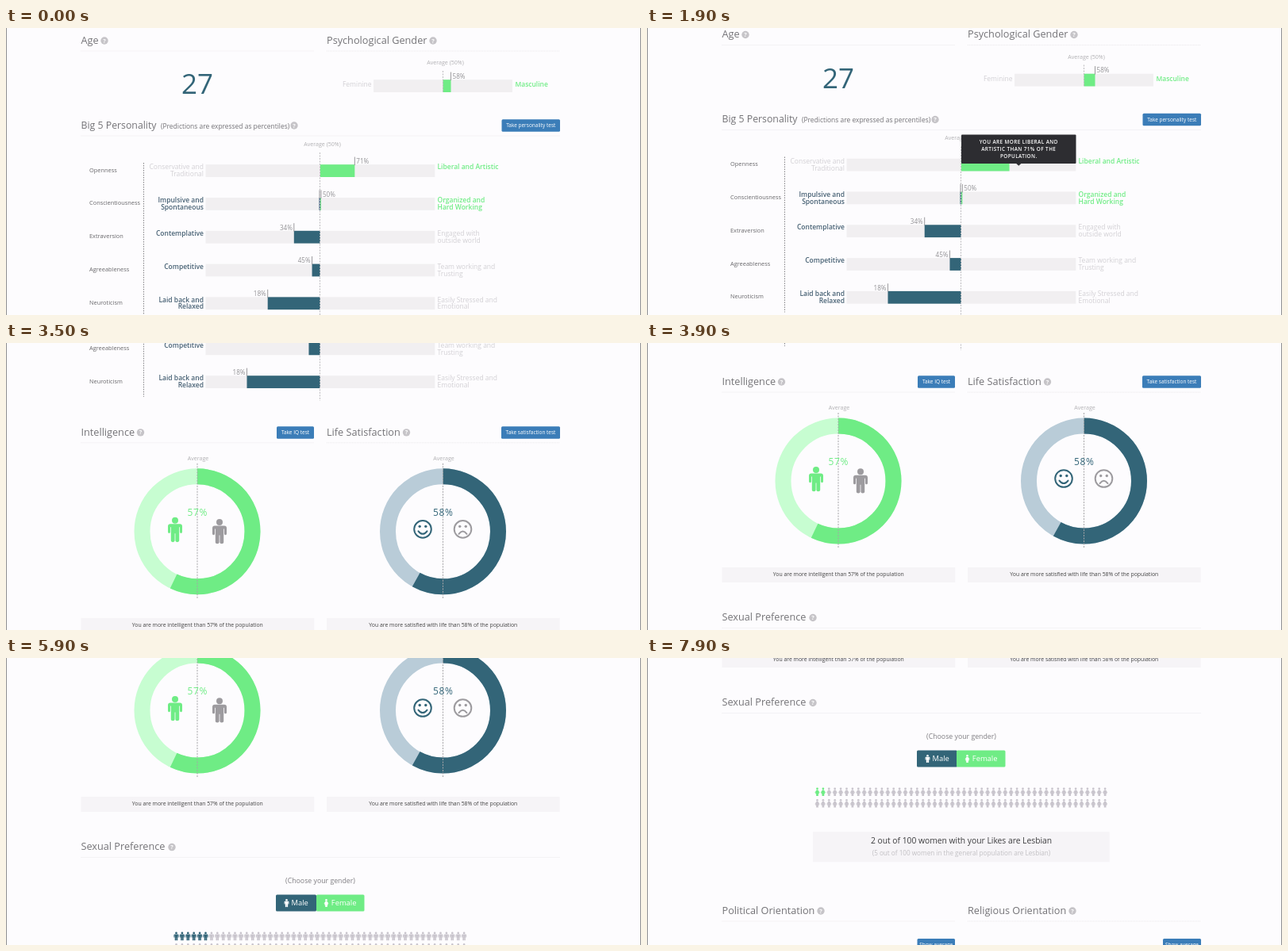
These frames come from a looping animation (800 by 362 pixels, 8 s). An HTML page:

```html
<!DOCTYPE html>
<html lang="en">
<head>
<meta charset="utf-8">
<title>Personality results</title>
<style>
  html, body { margin: 0; width: 100%; height: 100%; overflow: hidden; background: #fdfcfe; }
  svg { display: block; font-family: "Open Sans", sans-serif; }
</style>
</head>
<body>
<svg id="stage" width="800" height="362" viewBox="0 0 800 362"></svg>
<script>
const GREEN = '#6fec85', TEAL = '#336578', TRACK = '#f1eff1', PANEL = '#f6f4f7',
      FADED = '#d2d0d4', AXIS = '#bdbcbf', TICK = '#9c9b9e', BLUE = '#3b7db8', DARK = '#2d2d31';
const LOOP = 8000;

// Shape helpers; a text's y is the middle of its capitals.
const rect = (x, y, w, h, fill, more = '') =>
  `<rect x="${x}" y="${y}" width="${w}" height="${h}" fill="${fill}" ${more}/>`;
const text = (x, y, size, fill, str, anchor = 'start', more = '') =>
  `<text x="${x}" y="${y + size * .35}" font-size="${size}" fill="${fill}" text-anchor="${anchor}" ${more}>${str}</text>`;
const line = (x1, y1, x2, y2, color, dash = '', width = 1) =>
  `<line x1="${x1}" y1="${y1}" x2="${x2}" y2="${y2}" stroke="${color}" stroke-width="${width}" stroke-dasharray="${dash}"/>`;

const BODY = {
  man: 'M3 8.5h12q3 0 3 3v7q0 1.6-1.5 1.6t-1.5-1.6v-6h-.8v17q0 1.8-2.4 1.8t-2.4-1.8v-9h-.8v9q0 1.8-2.4 1.8t-2.4-1.8v-17h-.8v6q0 1.6-1.5 1.6t-1.5-1.6v-7q0-3 3-3z',
  woman: 'M6 8.5h6l6 9.5-2 1.5-3.2-4.5 3.7 8H13v8H5v-8H1.5l3.7-8L2 19.5 0 18z'
};
const person = (kind, cx, cy, height, fill) => {
  const s = height / 31;
  return `<g transform="translate(${cx - 9 * s} ${cy - 15.5 * s}) scale(${s})" fill="${fill}">
    <circle cx="9" cy="4" r="4"/><path d="${BODY[kind]}"/></g>`;
};
const face = (cx, cy, color, mouth) =>
  `<g transform="translate(${cx} ${cy})" fill="none" stroke="${color}" stroke-width="2" stroke-linecap="round">
    <circle r="10.8"/><path d="${mouth}"/>
    <g fill="${color}" stroke="none"><circle cx="-3.8" cy="-3.5" r="1.7"/><circle cx="3.8" cy="-3.5" r="1.7"/></g></g>`;

const heading = (x, y, str, helpX, right, size = 12.7) =>
  text(x, y, size, '#747377', str) +
  `<circle cx="${helpX}" cy="${y + .5}" r="4.7" fill="#c6c4c8"/>` +
  text(helpX, y + .5, 7.4, '#fff', '?', 'middle', 'font-weight="700"') +
  line(x, y + 13.5, right, y + 13.5, '#e9e7ea', '1 1');
const button = (x, y, w, str) =>
  rect(x, y, w, 15.5, BLUE, 'rx="1.5"') + text(x + w / 2, y + 7.6, 6.5, '#fff', str, 'middle');

// A bar growing from the 50% axis.
const meters = [];
function meter(x, w, cy, value, label) {
  const i = meters.length, up = value > 50, mid = x + w / 2;
  meters.push({ mid, reach: (value - 50) / 100 * w });
  return rect(x, cy - 7.9, w, 15.8, TRACK) +
    rect(mid, cy - 7.9, 0, 15.8, up ? GREEN : TEAL, `id="bar${i}"`) +
    `<g id="tip${i}">` + line(0, cy - 17.5, 0, cy - 7, TICK) +
    text(up ? 2 : -2, cy - 12, 8.1, '#949396', label, up ? 'start' : 'end') + '</g>';
}
function sideLabel(x, cy, str, anchor, color) {
  const faded = color === FADED;
  const more = faded ? '' : 'font-weight="600"';
  return str.split('|').map((s, i) =>
    text(x, cy - 4.7 + i * 8.9, 8.5, color, s, anchor, more)).join('');
}

const traits = [
  ['Openness', 71, 'Conservative and|Traditional', 'Liberal and Artistic'],
  ['Conscientiousness', 50.5, 'Impulsive and|Spontaneous', 'Organized and|Hard Working'],
  ['Extraversion', 34, 'Contemplative', 'Engaged with|outside world'],
  ['Agreeableness', 45, 'Competitive', 'Team working and|Trusting'],
  ['Neuroticism', 18, 'Laid back and|Relaxed', 'Easily Stressed and|Emotional']
];
const traitRow = ([name, value, low, high], i) => {
  const cy = 180.1 + i * 41.8, up = value > 50;
  return text(105, cy - 1, 7.4, '#68676a', name) +
    meter(251.5, 288.8, cy, value, Math.floor(value) + '%') +
    (i === 1 ? rect(394.5, cy - 7.9, 1.6, 15.8, TEAL) + line(395, cy - 17.5, 395, cy - 7, TICK) : '') +
    sideLabel(249, cy, low, 'end', i ? '#466073' : FADED) +
    sideLabel(543.5, cy, high, 'start', up ? GREEN : FADED);
};

function donut(cx, share, color, pale, icons) {
  const cy = 536, r = 69.5, len = 2 * Math.PI * r;
  const ring = (stroke, dash) => `<circle cx="${cx}" cy="${cy}" r="${r}" fill="none" stroke="${stroke}"
    stroke-width="20" stroke-dasharray="${dash}" transform="rotate(-90 ${cx} ${cy})"/>`;
  return text(cx + 1, 443.5, 7.1, '#b2b1b4', 'Average', 'middle') +
    ring(pale, '') + ring(color, `${len * share / 100} ${len}`) +
    line(cx, 450, cx, 621, '#a5a4a7', '2 1.5') +
    text(cx + .3, 512, 12, color, share + '%', 'middle', 'letter-spacing=".6"') + icons;
}
const panel = (x, str) => rect(x, 645, 293.7, 19, PANEL) + text(x + 146.8, 654, 6.87, '#444', str, 'middle');

function tooltip(id, x, y, w, h, size, gap, spacing, lines) {
  const cx = x + w / 2, first = y + h / 2 - (lines.length - 1) * gap / 2;
  return `<g id="${id}">` + rect(x, y, w, h, DARK, 'rx="1"') +
    `<path d="M${cx - 3} ${y + h}h6l-3 2.8z" fill="${DARK}"/>` +
    lines.map((s, i) => text(cx, first + i * gap, size, '#fff', s, 'middle',
      `letter-spacing="${spacing}" font-weight="600"`)).join('') + '</g>';
}

function crowd(id, kind, count, color, result, general) {
  const people = Array.from({ length: 100 }, (_, i) =>
    person(kind, 214.5 + i % 50 * 7.4, i < 50 ? 820.8 : 835.3, 10.6, i < count ? color : '#c9c5cd'));
  return `<g id="${id}">` + people.join('') +
    text(396, 882.8, 10.3, '#3c3c3e', result, 'middle') +
    text(396, 898, 8.17, '#c2c0c4', general, 'middle') + '</g>';
}

const page = [
  heading(94.5, 15.5, 'Age', 124, 388),
  text(241, 70.8, 35, TEAL, '27', 'middle'),
  heading(404, 15.5, 'Psychological Gender', 538, 698),
  text(553.5, 44, 7.1, '#b2b1b4', 'Average (50%)', 'middle'),
  meter(463, 175, 73.1, 58, '58%'),
  line(550.5, 54, 550.5, 81, AXIS, '2 1.5'),
  text(460.5, 71.5, 8.5, FADED, 'Feminine', 'end'),
  text(641.5, 71.5, 8.45, GREEN, 'Masculine', 'start', 'font-weight="600"'),

  heading(94.5, 122.5, 'Big 5 Personality', 363, 698, 12.3),
  text(195, 123.7, 8.45, '#747377', '(Predictions are expressed as percentiles)'),
  button(624.5, 115.3, 73.5, 'Take personality test'),
  text(398.5, 146.5, 7.1, '#b2b1b4', 'Average (50%)', 'middle'),
  line(173.5, 170, 173.5, 366, '#858487', '1.5 1.5'),
  ...traits.map(traitRow),
  line(395.5, 157, 395.5, 371, AXIS, '2 1.5'),

  heading(94.5, 410.5, 'Intelligence', 169.5, 388),
  button(341, 403.3, 47, 'Take IQ test'),
  donut(241, 57, GREEN, '#c7fdd1', person('man', 213, 533.5, 31, GREEN) + person('man', 269, 535.7, 31, '#9d9b9f')),
  panel(94.5, 'You are more intelligent than 57% of the population'),
  heading(404, 410.5, 'Life Satisfaction', 504.5, 698),
  button(624, 403.3, 74, 'Take satisfaction test'),
  donut(550.5, 58, TEAL, '#b9ccd8',
    face(525, 533, TEAL, 'M-5.5 2.5Q0 9.5 5.5 2.5') + face(575.5, 533, '#9d9b9f', 'M-5 6Q0 -.5 5 6')),
  panel(404, 'You are more satisfied with life than 58% of the population'),

  heading(94.5, 708, 'Sexual Preference', 209, 698),
  text(396, 751, 8.75, '#807f83', '(Choose your gender)', 'middle'),
  rect(340, 768.5, 51, 21, TEAL, 'rx="1.5"'),
  rect(391, 768.5, 60.5, 21, GREEN, 'rx="1.5" id="female"'),
  person('man', 353.5, 779, 10, '#fff'), text(359.5, 779, 9.4, '#fff', 'Male'),
  person('woman', 403.5, 779, 10, '#fff'), text(409.8, 779, 9.4, '#fff', 'Female'),
  rect(209, 871.3, 373.7, 38, PANEL),
  crowd('men', 'man', 6, TEAL, '6 out of 100 men with your Likes are Gay',
    '(7 out of 100 men in the general population are Gay)'),
  crowd('women', 'woman', 2, GREEN, '2 out of 100 women with your Likes are Lesbian',
    '(5 out of 100 women in the general population are Lesbian)'),

  heading(94.5, 970.5, 'Political Orientation', 219, 388),
  button(340.5, 1006, 47.5, 'Show average'),
  heading(404, 970.5, 'Religious Orientation', 536, 698),
  button(650, 1006, 48, 'Show average'),

  tooltip('openTip', 396, 142, 144.5, 36.5, 6.4, 8.7, .4,
    ['YOU ARE MORE LIBERAL AND', 'ARTISTIC THAN 71% OF THE', 'POPULATION.']),
  tooltip('iqTip', 254.7, 508, 107.3, 17, 8.7, 0, .4, ['INTELLIGENCE: 57%'])
];

const stage = document.getElementById('stage');
stage.innerHTML = `<g id="page">${page.join('')}</g>` +
  line(.5, 0, .5, 362, '#8f8f92') + line(799.5, 0, 799.5, 362, '#8f8f92');

const el = id => document.getElementById(id);
const clamp = v => Math.min(1, Math.max(0, v));

// [time, scroll offset]
const scrollStops = [[0, 0], [100, 0], [500, 7.5], [1950, 7.5], [2100, 30], [2900, 191.5], [3500, 298],
  [3850, 358], [4050, 373.5], [5500, 373.5], [5650, 400], [6400, 609], [6550, 640], [6750, 652], [LOOP, 652]];
function scrollAt(t) {
  const i = scrollStops.findIndex(s => s[0] > t);
  const [t0, y0] = scrollStops[i - 1], [t1, y1] = scrollStops[i];
  return y0 + (y1 - y0) * (t - t0) / (t1 - t0);
}
const fade = (t, from, to) => Math.min(clamp((t - from) / 150), clamp((to - t) / 150));

function draw(t) {
  el('page').setAttribute('transform', `translate(0 ${-scrollAt(t)})`);
  const grown = 1 - .285 * (1 - clamp(t / 450)) ** 2;
  meters.forEach(({ mid, reach }, i) => {
    const end = mid + reach * grown;
    el('bar' + i).setAttribute('x', Math.min(mid, end));
    el('bar' + i).setAttribute('width', Math.abs(end - mid));
    el('tip' + i).setAttribute('transform', `translate(${end} 0)`);
  });
  el('openTip').setAttribute('opacity', fade(t, 1300, 2150));
  el('iqTip').setAttribute('opacity', fade(t, 4650, 5450));
  const female = t >= 7400;
  el('men').style.display = female ? 'none' : '';
  el('women').style.display = female ? '' : 'none';
  el('female').setAttribute('x', female ? 390 : 391);
  el('female').setAttribute('width', female ? 61.5 : 60.5);
}

const start = performance.now();
function tick() {
  draw((performance.now() - start) % LOOP);
  requestAnimationFrame(tick);
}
tick();
</script>
</body>
</html>
```
